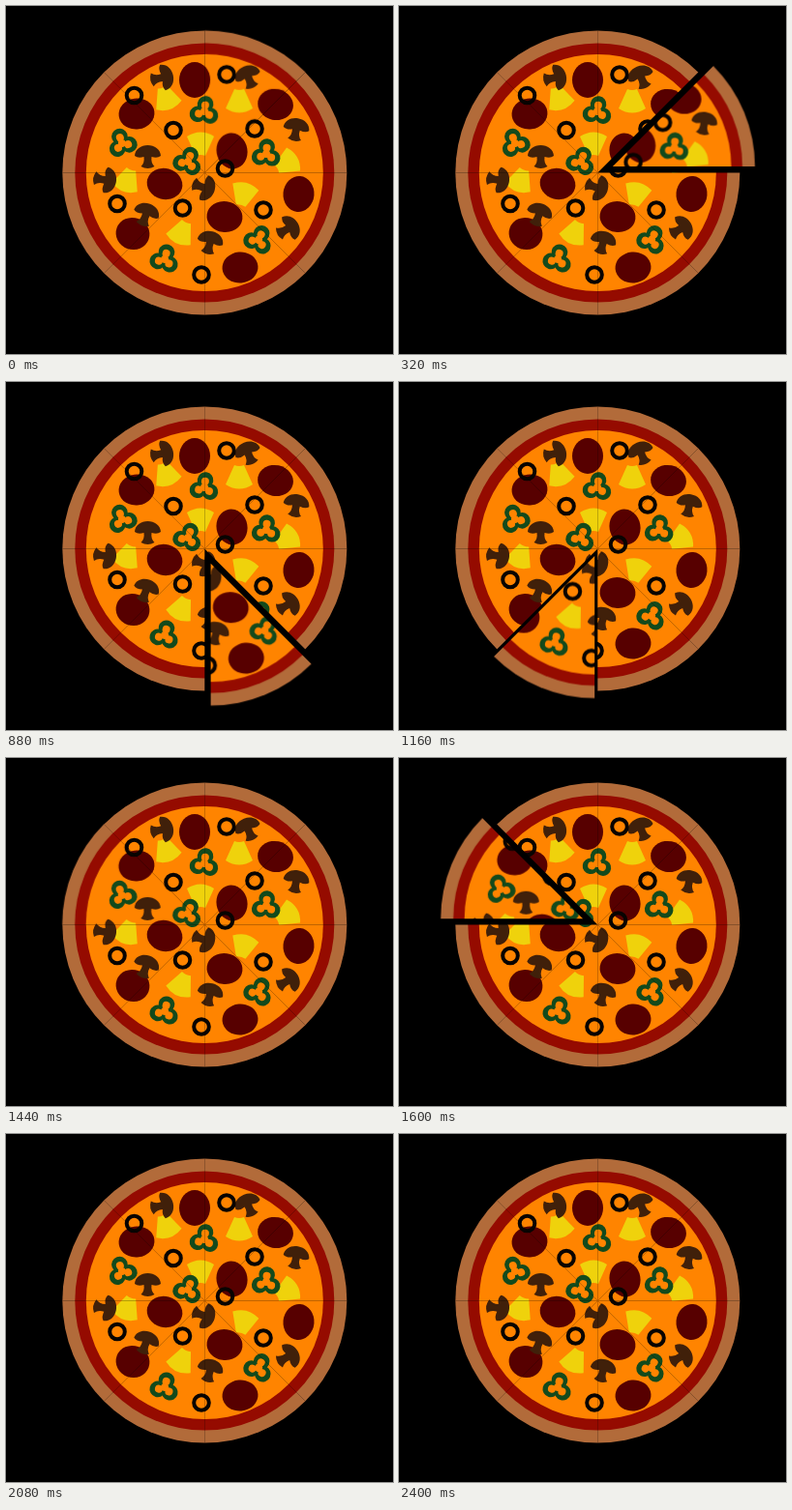
Animation, 400 px wide and 360 px high, one loop 2.88 s. Source, as an HTML page with a canvas:

```html
<!DOCTYPE html>
<html lang="en">
<head>
<meta charset="utf-8">
<title>Pizza slices</title>
<style>
  html, body { margin: 0; height: 100%; overflow: hidden; background: #000; }
  canvas { display: block; }
</style>
</head>
<body>
<canvas id="stage" width="400" height="360"></canvas>
<script>
const LOOP = 2880, STEP = 240, REACH = 25, SLICES = 8;
const CX = 205.3, CY = 172.5, RADIUS = 147;
const CHEESE = '#ff8400';
const rad = deg => deg * Math.PI / 180;

const stage = document.getElementById('stage').getContext('2d');
const pizza = document.createElement('canvas');
pizza.width = 400;
pizza.height = 360;
const p = pizza.getContext('2d');

function disc(x, y, r, color) {
  p.fillStyle = color;
  p.beginPath();
  p.arc(x, y, r, 0, 2 * Math.PI);
  p.fill();
}

// Draws one topping at each [x, y, degrees] place.
function scatter(places, draw) {
  for (const [x, y, deg = 0, ...rest] of places) {
    p.save();
    p.translate(x, y);
    p.rotate(rad(deg));
    draw(...rest);
    p.restore();
  }
}

function pineapple() {
  p.fillStyle = '#efd20c';
  p.fill(new Path2D('M-5 -13Q0 -11 5 -13L14 7Q0 16 -14 7Z'));
}

function pepper() {
  for (const [dist, r, color] of [[7.5, 8.3, '#134a1c'], [6.3, 4, CHEESE]]) {
    for (const a of [-90, 30, 150]) {
      disc(dist * Math.cos(rad(a)), dist * Math.sin(rad(a)), r, color);
    }
  }
  disc(0, 0, 4, CHEESE);
}

function pepperoni(rx = 18.5, ry = 16) {
  p.fillStyle = '#570000';
  p.beginPath();
  p.ellipse(0, 0, rx, ry, 0, 0, 2 * Math.PI);
  p.fill();
}

function mushroom() {
  p.fillStyle = '#40200a';
  p.fill(new Path2D('M-13.5 0C-13 -7 -7 -11 0 -11S13 -7 13.5 0Q10 3 4 1Q3 7 7 11Q0 15 -7 11Q-3 7 -4 1Q-10 3 -13.5 0Z'));
}

function olive() {
  p.lineWidth = 4;
  p.strokeStyle = '#080402';
  p.beginPath();
  p.arc(0, 0, 7.8, 0, 2 * Math.PI);
  p.stroke();
}

function bake() {
  disc(CX, CY, RADIUS, '#b26b3a');
  disc(CX, CY, 134, '#950b00');
  disc(CX, CY, 122.5, CHEESE);
  scatter([[166, 96, -20], [241, 99], [201, 142, 180], [291, 162, -120],
    [125, 181, 20], [246, 194, 195], [181, 235, 25]], pineapple);
  scatter([[205, 109, 8], [120, 142, -20], [188, 161, 20], [269, 153, 5],
    [261, 242, 25], [164, 262, 15]], pepper);
  scatter([[195, 76.5, 90], [278.5, 102, 12], [135, 111.5, -8], [233.5, 150, 80],
    [164, 184, 15], [302.5, 194.5, 95], [226, 218, 8], [131, 235.5, 20, 17.5, 16.5],
    [242, 270.5, -5]], pepperoni);
  scatter([[162, 74, 78], [250, 73, -22], [300, 127, 10], [146.5, 155, 0],
    [103, 180, 100], [205, 188, 110], [145, 215, 20], [211, 244, 14],
    [292, 230, 60]], mushroom);
  scatter([[228, 71], [132.5, 92.5], [173, 128.5], [257, 127], [226.5, 168],
    [115, 204.5], [182.5, 209], [266, 211], [202, 278]], olive);
}

function drawSlice(i, offset) {
  const start = rad(-90 + i * 45), mid = start + rad(22.5);
  stage.save();
  stage.translate(offset * Math.cos(mid), offset * Math.sin(mid));
  stage.beginPath();
  stage.moveTo(CX, CY);
  stage.arc(CX, CY, RADIUS + 8, start, start + rad(45));
  stage.closePath();
  stage.clip();
  stage.drawImage(pizza, 0, 0);
  stage.restore();
}

// Slices slide out and back one after another, clockwise; then a rest.
function render() {
  const t = performance.now() % LOOP;
  stage.fillStyle = '#000';
  stage.fillRect(0, 0, 400, 360);
  for (let i = 0; i < SLICES; i++) {
    const phase = t / STEP - i;
    drawSlice(i, REACH * Math.max(0, 1 - Math.abs(2 * phase - 1)));
  }
  requestAnimationFrame(render);
}

bake();
render();
</script>
</body>
</html>
```
